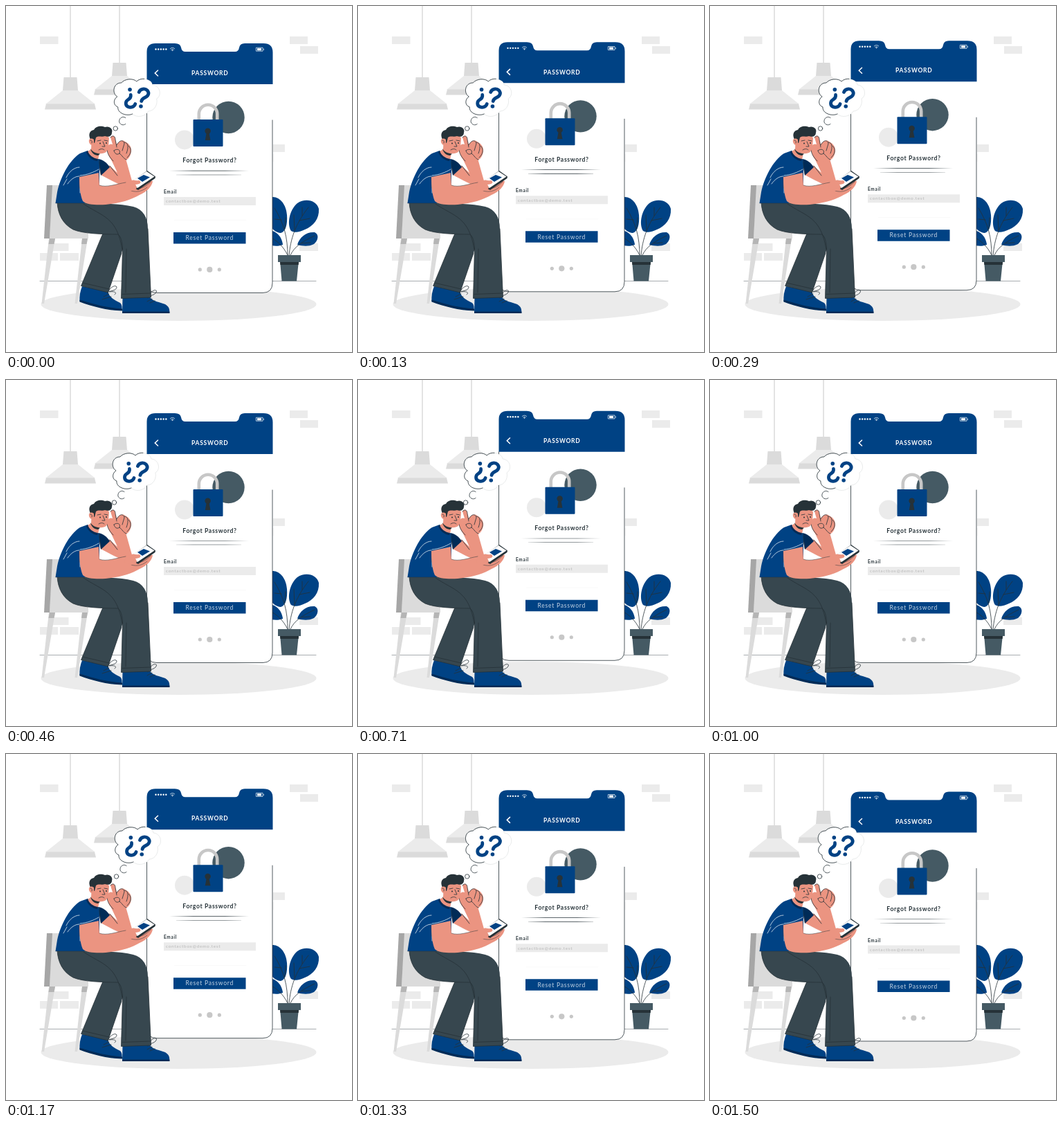
An HTML page for the animation above (1.54 s loop, 500 by 500 pixels).

```html
<!DOCTYPE html>
<html lang="en">
<head>
<meta charset="utf-8">
<title>Forgot password</title>
<style>
  html, body { margin: 0; width: 100%; height: 100%; overflow: hidden; background: #fff; }
  svg { display: block; width: 100vw; height: 100vh; }
  text { font-family: Lato, "Open Sans", sans-serif; }
  .bold { font-weight: 700; }
  .blue { fill: #004284; }
  .navy { fill: #002b57; }
  .dark { fill: #263238; }
  .slate { fill: #455a64; }
  .cloth { fill: #37474f; }
  .skin { fill: #eb9481; }
  .pale { fill: #ebebeb; }
  .grey { fill: #dbdbdb; }
  .white { fill: #fff; }
  .ink { fill: none; stroke: #263238; stroke-width: .8; stroke-linecap: round; stroke-linejoin: round; }
  .light { fill: none; stroke: #fff; stroke-width: .7; stroke-linecap: round; }
  .mark { fill: none; stroke: #004284; stroke-width: 4.8; stroke-linecap: round; }
</style>
</head>
<body>
<svg viewBox="0 0 500 500">
  <defs>
    <g id="lamp">
      <path d="M0 0V103" fill="none" stroke="#c7c7c7"/>
      <path class="grey" d="M-9.500 103H9.500L11 122H-11Z"/>
      <path class="pale" d="M-11 122H11L36 142H-36Z"/>
      <path class="grey" d="M-35 141.500H35L37 149.500H-37Z"/>
    </g>
    <linearGradient id="fade">
      <stop offset="0" stop-color="#263238" stop-opacity="0"/>
      <stop offset=".3" stop-color="#263238"/>
      <stop offset=".7" stop-color="#263238"/>
      <stop offset="1" stop-color="#263238" stop-opacity="0"/>
    </linearGradient>
    <path id="puff" d="M161 131C153 126 155 111 167 111C172 105 184 104 189 109C196 103 211 105 212 114C223 115 226 129 218 134C220 143 214 152 206 152C202 160 189 162 183 156C175 160 161 155 162 146C154 143 156 134 161 131Z"/>
  </defs>

  <g id="wall" class="pale">
    <path d="M49 44h26.500v11H49ZM410 44h26v11h-26ZM425 58h26v11h-26ZM386 200h17v11h-17ZM65 343h25.500v11H65ZM49 357h26v11H49ZM78 357h27v11H78ZM424 343h27v11h-27Z"/>
    <path fill="#fafafa" d="M385 214h3v11h-3Z"/>
  </g>
  <use href="#lamp" x="93"/>
  <use href="#lamp" x="164" y="-21"/>
  <path class="ink" d="M49 397.500H448" style="stroke-width:.4"/>
  <ellipse class="pale" cx="249.500" cy="431" rx="199" ry="24"/>

  <g id="plant">
    <path class="blue" d="M380 277C393 272 405 285 406 302C407 316 404 326 397 328C391 328 385 323 380 316Z"/>
    <path class="blue" d="M412 325C406 316 409 295 421 285C433 277 449 281 452 293C453 308 444 318 432 323C424 327 417 328 412 325Z"/>
    <path class="blue" d="M421 345C424 334 434 326 446 327C453 330 451 339 445 344C437 348 429 347 421 345Z"/>
    <path class="blue" d="M378 324C389 323 399 333 400 345C393 348 384 347 378 344Z"/>
    <path class="ink" d="M409 361C411 337 418 315 437 291M407 361C407 334 402 315 388 292M411 360C417 347 429 340 446 332M407 360C401 348 393 340 382 334M417 324L416 302M424 310L439 307M428 303L428 291M403 322L404 306M398 309L388 308M427 343L440 342"/>
    <path class="slate" d="M396 368H423L420 397.500H398.500Z"/>
    <path class="dark" d="M396 370H423L422.700 374H396.400Z"/>
    <path class="slate" d="M393 360H426V370H393Z"/>
  </g>

  <g id="chair">
    <path class="grey" d="M62 336H71L55 430H51.500ZM110 336H118L103 430H99.500Z"/>
    <path fill="#b5b5b5" d="M63 336H71L69.500 344H61.500ZM110 336H118L116.500 344H109Z"/>
    <path class="grey" d="M66 259H80L78 290L119 312V336H63Z"/>
    <path fill="#a6a6a6" d="M59 259H67L63 336H55Z"/>
  </g>

  <g id="phone">
    <path class="white" d="M203.500 66Q203.500 54 216 54H372Q385 54 385 67V400Q385 414.500 371 414.500H218Q203.500 414.500 203.500 400Z"/>
    <path class="ink" d="M203.500 113V400Q203.500 414.500 218 414.500H371Q385 414.500 385 400V165"/>
    <path class="blue" d="M203.500 113V66Q203.500 54 216 54H244Q252 54 253 60T259 66H331Q336 66 337 60T345 54H372Q385.500 54 385.500 67V113Z"/>
    <g class="white">
      <circle cx="216.500" cy="62.500" r="1.200"/><circle cx="220.200" cy="62.500" r="1.200"/>
      <circle cx="223.900" cy="62.500" r="1.200"/><circle cx="227.600" cy="62.500" r="1.200"/>
      <circle cx="231.300" cy="62.500" r="1.200"/>
      <circle cx="240.500" cy="64.300" r=".8"/>
      <path d="M363 61.200H369V64.300H363Z"/>
    </g>
    <path class="light" d="M237.300 61.700Q240.500 58.800 243.700 61.700M238.800 63.200Q240.500 61.600 242.200 63.200M361.800 60.200H371V65.200H361.800ZM372.400 62V63.500"/>
    <path class="light" d="M219.500 93L215.300 97L219.500 101" style="stroke-width:1.500"/>
    <text class="bold white" x="294.700" y="100.200" font-size="8.500" letter-spacing=".7" text-anchor="middle">PASSWORD</text>

    <circle class="slate" cx="321.500" cy="161" r="23.200"/>
    <circle class="pale" cx="258" cy="193.500" r="14"/>
    <path d="M278.800 167V156A13.200 13.200 0 0 1 305.200 156V167" fill="none" stroke="#c7c7c7" stroke-width="4.600"/>
    <rect class="blue" x="270.500" y="164" width="43" height="39" rx="1"/>
    <path class="dark" d="M289.800 183L287.800 194H295.400L293.400 183Z"/>
    <circle class="dark" cx="291.600" cy="180.800" r="4.200"/>

    <text class="bold dark" x="294.500" y="226.500" font-size="8.600" letter-spacing=".65" text-anchor="middle">Forgot Password?</text>
    <path d="M236 237.900H351V238.600H236ZM246 243.700H340V244.300H246Z" fill="url(#fade)"/>
    <text class="bold dark" x="228" y="271" font-size="6.500" letter-spacing=".7">Email</text>
    <path class="pale" d="M228 276H361V288H228Z"/>
    <text x="231" y="284.300" font-size="6.500" letter-spacing=".68" fill="#b8b8b8">contactbox@demo.test</text>
    <path d="M243 309.500H347" stroke="#f7f7f7" stroke-width=".7"/>
    <path class="blue" d="M242 327H346.500V343.500H242Z"/>
    <text x="294.300" y="338.300" font-size="8.600" letter-spacing=".75" fill="#c4d3e4" text-anchor="middle">Reset Password</text>
    <g fill="#c7c7c7">
      <circle cx="280.300" cy="381" r="2.600"/><circle cx="294.300" cy="381" r="4.100"/><circle cx="308.300" cy="381" r="2.600"/>
    </g>
  </g>

  <g id="bubble">
    <use href="#puff" class="white"/>
    <use href="#puff" class="ink" style="stroke-width:.25;opacity:.4"/>
    <path class="ink" d="M183 156C175 160 161 155 162 146C154 143 156 134 161 131C153 126 155 111 167 111C172 105 184 104 189 109C192 106 196 105 200 105.300"/>
    <ellipse class="white" cx="169.500" cy="166" rx="5.600" ry="5.800"/>
    <path class="ink" d="M173 161.500C168 158 163 163 164 168C166 172 170 173 173 170.500"/>
    <circle class="ink" cx="158.500" cy="177" r="3.200" style="fill:#fff"/>
    <path class="mark" d="M192.500 124.500C194 119.500 201 118.500 204.500 122C208 126 205.500 130.500 201.500 132C198 133.500 196.500 134.500 196 137.500M180.500 128.500C181 132 179 134 176.500 135.500C172.500 138 172.500 143.500 176.500 145.500C181 147.500 186 145.500 187 141.500"/>
    <circle class="blue" cx="195.200" cy="145" r="2.800"/>
    <circle class="blue" cx="179.300" cy="120.800" r="2.800"/>
  </g>

  <g id="man">
    <!-- shoes -->
    <path class="blue" d="M110 405L147 412C149 421 157 425 165 429C168 432 168 437 167 440C145 439 124 433 106.500 427C106 420 107 412 110 405Z"/>
    <path class="navy" d="M106.500 424.500C126 431 147 436 168 437.500V440.500C146 440 124 434 106.500 427.500Z"/>
    <path class="blue" d="M168.500 421H208C213 427 222 428 230 431C235 434 237 438 236 443.500H168Z"/>
    <path class="navy" d="M168 441.500H236.500V444H168Z"/>
    <path class="ink" d="M147 415C149 407 158 402 160 406C160 411 153 411 149 413C157 412 161 414 157 417M205 422C207 413 216 408 217.500 412C217 417 210 418 206 420M141 420L149 416M139 424L152 420M204 427L211 423M208 429L215 426"/>

    <!-- legs -->
    <path class="cloth" d="M140 318L194 312C178 331 170 346 166 360L147.500 414L108.500 404.500L139 331Z"/>
    <path class="ink" d="M139 331L108.500 404.500L147.500 414L167 357M110.500 400L149 409"/>
    <path class="cloth" d="M74 284H113C139 286 164 285 184 290C198 294 205 305 205 322L209.500 421L166.500 422.500L168.500 350C168 340 166 333 162 330C139 330 111 329 97 323C82 315 75 301 74 284Z"/>
    <path class="ink" d="M168.500 352C168 340 166 333 162 330C139 330 111 329 97 323C82 315 75 301 74 284M205 322L209.500 421L166.500 422.500L168.500 350M168 416.500L209 415M112 286C140 305 160 304 168 352M174 351L173 414"/>

    <!-- raised arm -->
    <path class="skin" d="M134 228L150 231L161 241L152 222L172 217L181 249C184 257 179 262 172 261C159 256 146 249 137 244Z"/>
    <path class="navy" d="M133 221C141 222 146 227 150 233L137 245Z"/>
    <path class="ink" d="M150 231L161 245"/>
    <path class="skin" d="M151 190C154 186 158 188 158 193L160 200C163 195 169 193 172 196C177 198 181 203 181 208C181 216 177 222 171 224L155 226C149 219 146 212 146 207C146 202 150 198 154 200Z"/>
    <path class="ink" d="M151 190C154 186 158 188 158 193L160 204M160 201C164 193 170 193 171 199L168 209M171 197C176 197 178 203 174 213M177 202C183 207 180 215 175 219M156 209C161 205 166 208 164 213C160 216 157 213 156 209M164 213C168 216 170 221 174 222M146 207C146 213 150 219 155 224"/>

    <!-- torso -->
    <path class="blue" d="M118 209L107 213C91 223 78 249 74 269L71.500 285H113L135 262V223C132 219 127 219 123 217Z"/>
    <path class="light" d="M87 248C91 239 99 233 106 233M89 257C94 250 100 246 106 246M107 245C118 244 127 240 134 236M83 259L88 250M107 253V270"/>
    <path class="ink" d="M137 243L134 223M106 248V263M72 285H112" style="stroke-width:.5"/>

    <!-- head -->
    <path class="skin" d="M124 188C133 181 146 185 149 191L148 204C147 211 142 214 135 213L133 222C127 225 120 218 118 210L123 207Z"/>
    <path class="dark" d="M122 193C118 184 122 180 127 179C130 173 138 173 143 175C149 173 155 177 153 183C153 188 148 190 143 188C138 190 134 187 130 190L128 198L123 196Z"/>
    <path class="dark" d="M122 206C125 211 130 213 136 213.500L133 216C128 216 123 212 122 206Z"/>
    <path class="skin" d="M127 193C121 189 118 194 121 199C123 202 126 201 127 199Z"/>
    <path class="ink" d="M122 194C124 194 125 196 124 198M132 195L137 194M142 194L147 195M140 196L143 203L139 203M134 208C137 206 140 206 142 208"/>
    <circle class="dark" cx="136" cy="198.500" r="1"/>
    <circle class="dark" cx="145" cy="198" r="1"/>
    <path class="navy" d="M118 209C120 216 126 220 133 221L132 224C124 223 118 217 116 211Z"/>

    <!-- front arm and handset -->
    <path class="skin" d="M106 247L134 241L135 259C145 263 160 257 173 255C182 250 191 251 202 251L212 253C211 261 203 269 193 273C181 280 165 285 144 287C131 288 116 287 111 282C107 273 106 260 106 247Z"/>
    <path class="ink" d="M135 259C145 263 160 257 173 255M188 263C196 265 203 260 209 254M181 267C190 270 198 267 204 262" style="stroke-width:.5"/>
    <path class="dark" d="M204 238L216 246.500L215.500 249L191 266L188 264.500L178 257Z"/>
    <path class="white" d="M203 239L214.500 246.500L190 263L178.500 256Z"/>
    <path class="blue" d="M190 249L199 244L208 247.500L197 254Z"/>
    <path class="skin" d="M173 256C180 250 187 253 192 252C197 254 194 258 187 258C191 263 188 267 181 267L171 263Z"/>
  </g>
</svg>
<script>
  const LOOP = 1540, STEPS = 37, RISE = 10;
  const SHAKE = [0, -1, 2, -4, 4, -4, 4, -4, 2, -1, 0];
  const phone = document.getElementById("phone");
  const bubble = document.getElementById("bubble");
  const start = performance.now();

  // Linear interpolation through evenly spaced keys.
  function along(keys, p) {
    const at = p * (keys.length - 1), i = Math.min(Math.floor(at), keys.length - 2);
    return keys[i] + (keys[i + 1] - keys[i]) * (at - i);
  }

  // Motion is held at 24 poses per second.
  function draw() {
    const t = Math.max(0, performance.now() - start) % LOOP;
    const step = Math.floor(t / LOOP * STEPS + .1) % STEPS;
    const p = (step + 1) / STEPS;
    const y = along([.5, .5 - RISE, .5], p);
    phone.setAttribute("transform", `translate(0 ${y.toFixed(3)})`);
    bubble.setAttribute("transform", `translate(${along(SHAKE, p).toFixed(3)} 0)`);
    requestAnimationFrame(draw);
  }
  draw();
</script>
</body>
</html>
```
